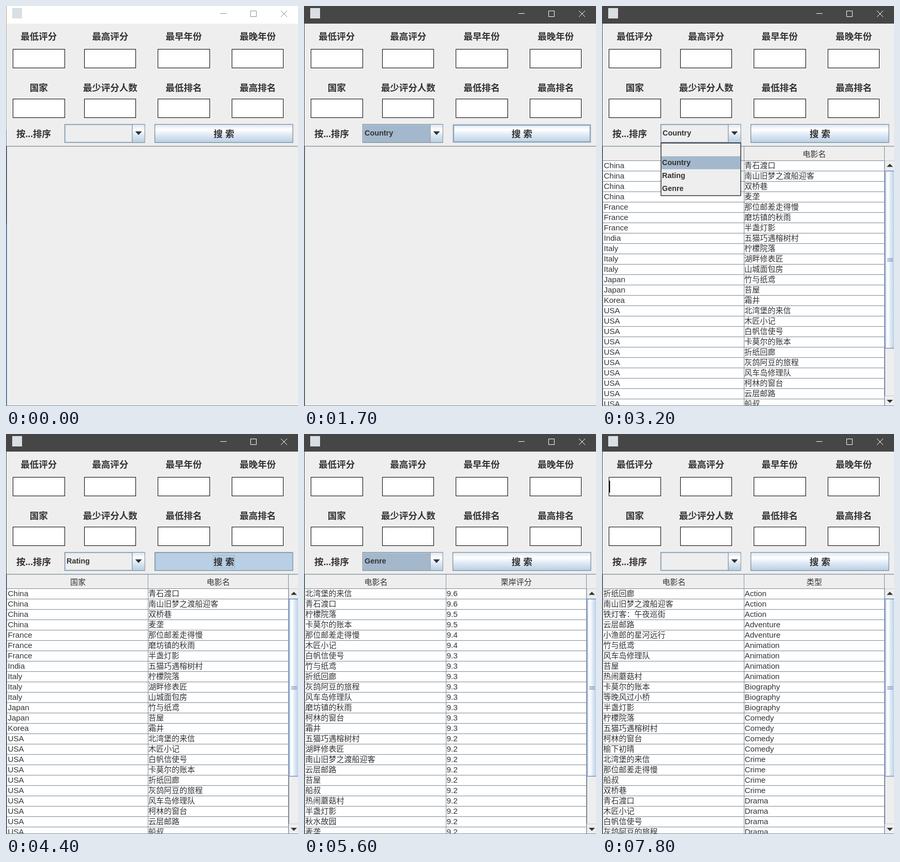
An HTML page for the animation above (8000 ms loop, 564x772 px).

```html
<!DOCTYPE html>
<html lang="zh-CN">
<head>
<meta charset="utf-8">
<title>Film search</title>
<style>
  html, body { margin: 0; width: 100%; height: 100%; overflow: hidden; background: #eee; }
  svg { display: block; width: 564px; height: 772px; }
  text { font: 15px "Liberation Sans", "Noto Sans CJK SC", "Noto Sans CJK", sans-serif; fill: #333; white-space: pre; }
  .label { font-size: 17.5px; font-weight: bold; text-anchor: middle; }
  .item { font-size: 14.4px; font-weight: bold; }
  .head { text-anchor: middle; }
  .latin { font-size: 15.2px; }
</style>
</head>
<body>
<svg id="stage" viewBox="0 0 564 772">
  <defs>
    <linearGradient id="down" x2="0" y2="1">
      <stop offset="0" stop-color="#dde8f3"/><stop offset=".3" stop-color="#fff"/>
      <stop offset=".6" stop-color="#dde8f3"/><stop offset="1" stop-color="#b8cfe5"/>
    </linearGradient>
    <linearGradient id="across">
      <stop offset="0" stop-color="#dde8f3"/><stop offset=".3" stop-color="#fff"/>
      <stop offset=".6" stop-color="#dde8f3"/><stop offset="1" stop-color="#b8cfe5"/>
    </linearGradient>
  </defs>
  <g id="scene"></g>
</svg>
<script>
const LOOP = 8000;
const LINE = '#7a8a99', PALE = '#b8cfe5', PICK = '#a3b8cc', PANEL = '#eee', INK = '#333';
const OPTIONS = ['', 'Country', 'Rating', 'Genre'];

const films = {
  a: '青石渡口', b: '南山旧梦之渡船迎客', c: '双桥巷', d: '麦垄', e: '那位邮差走得慢',
  f: '磨坊镇的秋雨', g: '半盏灯影', h: '五猫巧遇榕树村', i: '柠檬院落', j: '湖畔修表匠',
  k: '山城面包房', l: '竹与纸鸢', m: '苔屋', n: '霜井', o: '北湾堡的来信', p: '木匠小记',
  q: '白帆信使号', r: '卡莫尔的账本', s: '折纸回廊', t: '灰鸽阿豆的旅程', u: '风车岛修理队',
  v: '柯林的窗台', w: '云层邮路', x: '船叔', y: '热闹蘑菇村', z: '秋水故园',
  A: '铁灯客：午夜巡街', B: '小渔郎的星河远行', C: '等晚风过小桥', D: '榆下初晴'
};

// Each group is a shared value followed by the keys of its films.
const tables = {
  Country: { heads: ['国家', '电影名'], groupFirst: true,
    groups: 'China abcd,France efg,India h,Italy ijk,Japan lm,Korea n,USA opqrstuvwx' },
  Rating: { heads: ['电影名', '栗岸评分'],
    groups: '9.6 oa,9.5 ir,9.4 ep,9.3 qlstufvn,9.2 hjbwmxygzd' },
  Genre: { heads: ['电影名', '类型'],
    groups: 'Action sbA,Adventure wB,Animation lumy,Biography rCg,Comedy ihvD,Crime oexc,Drama apqt' }
};

// popup is the highlighted option while the list is open, -1 when closed.
const start = { active: false, popup: -1, value: '', picked: false, button: 'normal',
                focus: false, table: '', caret: false };
const press = { button: 'pressed', picked: false, focus: true };
const close = value => ({ popup: -1, value, picked: true });
const steps = [
  [0, {}], [600, { active: true }],
  [700, { popup: 0 }], [800, { popup: 1 }], [900, { popup: 2 }], [1300, { popup: 1 }],
  [1600, close('Country')], [1700, { button: 'hover' }],
  [2200, press], [2300, { button: 'hover', table: 'Country' }], [2400, { button: 'normal' }],
  [2900, { popup: 1, focus: false }], [3100, { popup: 0 }], [3200, { popup: 1 }], [3600, { popup: 2 }],
  [3900, close('Rating')], [4100, { button: 'hover' }],
  [4400, press], [4600, { button: 'hover', table: 'Rating' }], [4700, { button: 'normal' }],
  [5000, { popup: 2, focus: false }], [5100, { popup: 1 }], [5200, { popup: 2 }], [5300, { popup: 3 }],
  [5600, close('Genre')], [5800, { button: 'hover' }],
  [6100, press], [6200, { button: 'hover', table: 'Genre' }], [6300, { button: 'normal' }],
  [6600, { popup: 3, focus: false }], [6800, { popup: 0 }],
  [7200, close('')], [7800, { picked: false, caret: true }]
];
let last = start;
const timeline = steps.map(([time, change]) => ({ time, state: last = { ...last, ...change } }));

const fill = (x, y, w, h, color) =>
  `<rect x="${x}" y="${y}" width="${w}" height="${h}" fill="${color}"/>`;
const box = (x, y, w, h, stroke, color = 'none', width = 1.25) =>
  `<rect x="${x + .5}" y="${y + .5}" width="${w}" height="${h}" fill="${color}" stroke="${stroke}" stroke-width="${width}"/>`;
const path = (d, stroke, color = 'none') => `<path d="${d}" stroke="${stroke}" fill="${color}"/>`;
const text = (x, y, str, cls = '') => `<text x="${x}" y="${y}" class="${cls}">${str}</text>`;

function titleBar({ active }) {
  const ink = active ? '#fff' : '#8c8c8c';
  const edge = active
    ? fill(0, 0, 1, 772, '#484848')
    : fill(0, 0, 1, 35, '#b9a85c') + fill(0, 35, 1, 205, '#aaa') + fill(0, 240, 1, 30, '#4a86c0') +
      fill(0, 270, 1, 90, '#35323c') + fill(0, 360, 1, 60, '#28305c') + fill(0, 420, 1, 352, '#3f74b4');
  return fill(0, 0, 564, 34, active ? '#464646' : '#fff') + edge +
    fill(12, 4, 19, 20, '#d9dfe3') +
    path('M414 14.5h12M472.5 9.5h11v11h-11z', ink) + path('M531 9l12 12M543 9l-12 12', ink);
}

function form({ caret }) {
  const columns = [[13, 113], [151, 250], [293, 393], [436, 535]];
  const rows = [
    [83, 65, ['最低评分', '最高评分', '最早年份', '最晚年份']],
    [179, 163.5, ['国家', '最少评分人数', '最低排名', '最高排名']]
  ];
  return rows.map(([top, base, names]) => names.map((name, i) => {
    const [left, right] = columns[i];
    return text(left + 50.3, base, name, 'label') + box(left, top, right - left, 36, '#000', '#fff', 1);
  }).join('')).join('') +
    text(53.5, 252.5, '按...排序', 'label') + (caret ? fill(14, 90, 1.5, 23, '#000') : '');
}

function combo({ value, picked }) {
  return box(113, 228, 154.5, 35, LINE, PANEL) +
    (picked ? fill(114.5, 229.5, 129, 33.5, PICK) : box(114.2, 229.2, 128.8, 32.6, PALE)) +
    fill(244, 229.2, 23.4, 33.7, 'url(#down)') + path('M244 228.5v35', LINE) +
    path('M249.5 242h13l-6.5 7z', 'none', INK) + text(117, 250, value, 'item');
}

function button({ button: mode, focus }) {
  const pressed = mode === 'pressed';
  let out = box(287, 228, 266.5, 35, mode === 'hover' ? PALE : LINE, pressed ? PALE : 'url(#down)');
  if (mode === 'hover') out += box(289.3, 230.3, 262, 30.5, PALE) + box(288.2, 229.2, 264.2, 32.6, LINE);
  if (pressed) out += path('M289 263v-33.5h265', '#9eb3c8');
  if (focus) out += box(400, 234, 41, 24, PICK);
  return out + text(421, 252.5, '搜 索', 'label');
}

function scrollBar() {
  return fill(546, 298, 18, 474, PANEL) + path('M546.5 660v92', LINE) +
    box(546, 298, 18, 19.5, '#c5ced6', PANEL, 1) + path('M550 310.5h12l-6-6z', 'none', INK) +
    box(546.5, 318, 18, 342, '#6382bf', 'url(#across)') +
    path('M551 487.5h11M551 490h11M551 492.5h11', '#6382bf') +
    box(546, 752, 18, 19, '#c5ced6', PANEL, 1) + path('M550 760h12l-6 6z', 'none', INK);
}

function results({ table }) {
  const frame = fill(1, 270, 563, 1.25, LINE) + path('M1.5 270v502M1 771.5h563', LINE);
  if (!table) return frame;
  const { heads, groups, groupFirst } = tables[table];
  const rows = groups.split(',').flatMap(group => {
    const [value, keys] = group.split(' ');
    return [...keys].map(key => [value, films[key]]);
  });
  const cells = rows.map(([value, film], i) => {
    const y = 313 + i * 20;
    return path(`M2 ${y + 5.5}h544`, LINE) +
      text(groupFirst ? 3.5 : 275.5, y, value, 'latin') + text(groupFirst ? 275 : 2.5, y, film);
  }).join('');
  return fill(2, 298, 544, 474, '#fff') + cells +
    path('M2.5 271v27M275.5 271v27', '#fff') +
    path('M2 298.5h544M274.5 271v501M545.5 271v501', LINE) +
    text(139, 291, heads[0], 'head') + text(410, 291, heads[1], 'head') + scrollBar() + frame;
}

function popup({ popup: chosen }) {
  if (chosen < 0) return '';
  return box(113.5, 264, 154, 101.5, '#111', PANEL) +
    fill(115, 265 + chosen * 25, 152, 25, PICK) +
    OPTIONS.map((name, i) => text(116, 282 + i * 25, name, 'item')).join('');
}

const scene = document.getElementById('scene');
const layers = [titleBar, form, combo, button, results, popup];
let shown = null;

function draw(now) {
  const time = now % LOOP;
  const { state } = timeline.findLast(step => step.time <= time);
  if (state !== shown) {
    shown = state;
    scene.innerHTML = fill(0, 0, 564, 772, PANEL) + layers.map(layer => layer(state)).join('');
  }
}

const origin = performance.now();
function tick() {
  draw(performance.now() - origin);
  requestAnimationFrame(tick);
}
tick();
</script>
</body>
</html>
```
